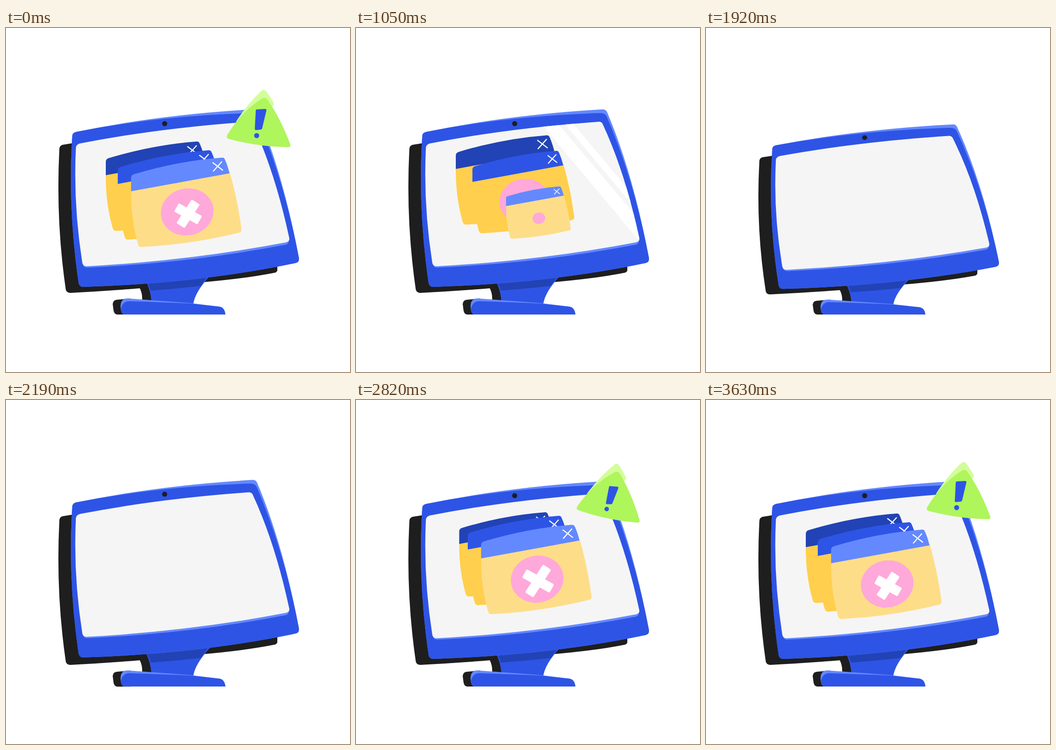
Animation, 748 px wide and 748 px high, one loop 3660 ms. Source, as an HTML page:

```html
<!DOCTYPE html>
<html lang="en">
<head>
<meta charset="utf-8">
<title>Monitor alert</title>
<style>
html, body { margin: 0; width: 100%; height: 100%; overflow: hidden; background: #fff; }
svg { display: block; width: 100vw; height: 100vh; }
.ink { fill: #1e1e1e; }
.blue { fill: #2e54e6; }
.navy { fill: #2143b5; }
.sky { fill: #6489ff; }
</style>
</head>
<body>
<svg viewBox="0 0 748 748" xmlns="http://www.w3.org/2000/svg">
  <defs>
    <path id="glass" d="M152 260Q153 253 161 251Q330 218 526 204Q533 203 536 208Q585 313 616 457Q617 464 609 466Q400 506 177 518Q168 519 166 511Q146 385 152 260Z"/>
    <clipPath id="pane"><use href="#glass"/></clipPath>
  </defs>
  <g id="monitor">
    <g id="shade" class="ink">
      <path d="M116 264Q116 256 123 254L160 248L540 480L590 500V526Q590 530 585 532Q520 545 425 553L330 562V592H296Q297 578 291 566Q215 572 140 576Q132 576 130 569Q108 418 116 264Z"/>
      <path d="M232 600Q233 592 240 591L270 588V623H242Q236 623 234 615Z"/>
    </g>
    <path class="blue" d="M302 540L450 532Q409 574 407 603H316Q317 574 302 546Z"/>
    <path class="navy" d="M302 540L446 532Q432 546 424 561Q370 567 315 571Q311 556 302 546Z"/>
    <path class="sky" d="M249 606Q249 588 264 588L400 598L465 606Q475 608 477 623H257Q250 622 249 606Z"/>
    <path class="blue" d="M250 610Q254 595 266 594Q330 596 400 599L465 606Q476 609 477 623H257Q251 622 250 610Z"/>
    <g id="head">
      <path class="sky" d="M144 236Q144 228 152 226Q330 189 535 177Q543 176 546 183Q602 315 637 500Q638 509 630 511Q420 555 168 563Q160 563 158 555Q134 392 144 236Z"/>
      <path class="blue" d="M144 236Q144 228 152 226Q330 191 530 185Q541 184 545 192Q605 332 637 500Q638 509 630 511Q420 555 168 563Q160 563 158 555Q134 392 144 236Z"/>
      <path class="sky" d="M166 508L168 516Q170 521 177 521Q400 511 609 471Q616 469 616 457Z"/>
      <use href="#glass" fill="#f5f5f5"/>
      <g clip-path="url(#pane)">
        <path id="glare" fill="#fff" d="M310 95L341 90L739 560L708 570ZM352 85L371 85L769 560L750 560Z"/>
      </g>
      <circle class="ink" cx="345" cy="208" r="5.5"/>
    </g>
  </g>
  <g id="windows"></g>
  <g id="alert">
    <path fill="#d3fd9b" d="M500 204Q524 166 555 137Q560 132 565 137Q574 148 583 165L560 200Z"/>
    <path fill="#aff55c" d="M481 233Q511 182 557 153Q562 150 567 154Q596 194 618 253Q620 260 612 259Q544 258 484 241Q478 239 481 233Z"/>
    <g id="mark" class="blue">
      <path d="M543 180Q543 177 546 177L563 176Q567 176 566 180L557 218Q556 221 553 221L544 222Q541 222 541 219Z"/>
      <circle cx="545" cy="234" r="5.5"/>
    </g>
  </g>
</svg>
<script>
const LOOP = 3660, BEAT = LOOP / 9;
const $ = id => document.getElementById(id);
const clamp = x => Math.min(1, Math.max(0, x));
const span = (t, from, length) => clamp((t - from) / length);
const wave = p => (1 - Math.cos(Math.PI * p)) / 2;
const hump = p => Math.sin(Math.PI * p);
const inOut = p => p < .5 ? 2 * p * p : 1 - 2 * (1 - p) ** 2;
const backIn = p => p * p * (3.5 * p - 2.5);
const pulse = t => wave(2 * (t + 20) / BEAT);

const about = (x, y, scale, turn = 0) =>
  `translate(${x} ${y}) rotate(${turn}) scale(${scale}) translate(${-x} ${-y})`;

function place(el, transform, shown = true) {
  el.setAttribute('transform', transform);
  el.setAttribute('visibility', shown ? 'visible' : 'hidden');
}

const windowArt = (bar, body) => `
  <path fill="${body}" d="M272 350L486 312Q503 370 512 437Q513 443 507 445Q400 471 296 476Q289 477 287 470Q271 414 272 350Z"/>
  <path fill="${bar}" d="M272 355V326Q272 320 278 318Q375 289 468 282Q474 281 476 286Q482 299 486 316Z"/>
  <path d="M450 293L471 309M469 291L451 311" fill="none" stroke="#fff" stroke-width="2.4" stroke-linecap="round"/>
  <ellipse class="dot" cx="394" cy="400" rx="57.5" ry="51" fill="#ffa8da"/>
  <g fill="#fff"><rect/><rect/></g>`;

// Back to front; "order" delays each window's entrance and exit.
const panes = [
  { dx: -55, dy: -35, order: 2, bar: '#2143b5', body: '#ffcf4d' },
  { dx: -29, dy: -16, order: 1, bar: '#2e54e6', body: '#ffcf4d' },
  { dx: 0, dy: 0, order: 0, bar: '#6489ff', body: '#fedd89' }
].map(p => {
  const g = document.createElementNS('http://www.w3.org/2000/svg', 'g');
  g.innerHTML = windowArt(p.bar, p.body);
  $('windows').append(g);
  return { ...p, g, dot: g.querySelector('.dot'), arms: g.querySelectorAll('rect') };
});

function leaving(t, order) {
  const start = 910 + 80 * order, gone = span(t, start, 310);
  const lift = wave(span(t, start - 180, 180));
  return { size: 1 - inOut(gone), lift, dot: 1 - inOut(span(gone, .15, .55)), cross: 1 - lift, hold: 0 };
}

function entering(t, order) {
  const start = 2410 + 60 * order;
  const lift = 1 - wave(span(t, start + 350, 180));
  return { size: inOut(span(t, start, 350)), lift, dot: 1, cross: wave(span(t, start + 180, 160)), hold: lift };
}

function drawPane({ dx, dy, order, g, dot, arms }, t) {
  const pose = (t < LOOP / 2 ? leaving : entering)(t, order);
  const rise = 14 * pose.lift * pose.size ** 3;
  place(g, `translate(${dx} ${dy - rise}) ${about(403, 440, pose.size)}`, pose.size > .002);
  dot.setAttribute('transform', about(394, 400, pose.dot * (1 + .04 * pulse(t)), -12));

  const reach = pose.cross * (.8 + .2 * Math.max(pulse(t), pose.hold));
  arms.forEach((arm, i) => {
    const len = (i ? 72 : 76) * reach, wide = 21 * Math.min(1, reach * 2);
    const attrs = { x: -len / 2, y: -wide / 2, width: len, height: wide, rx: 3 * reach,
      transform: `translate(396 404) rotate(${i ? 29 : -57})` };
    for (const name in attrs) arm.setAttribute(name, attrs[name]);
  });
}

function drawMonitor(t) {
  const hop = hump(span(t, 2140, 500));
  place($('monitor'), about(0, 622, `1 ${1 - .092 * hump(span(t, 1830, 310))}`));
  place($('head'), `translate(0 ${-10 * hop})`);
  place($('shade'), about(0, 576, `1 ${1 + .012 * hop}`));
  const sweep = t - (t < LOOP / 2 ? 990 : 2430);
  place($('glare'), `translate(${120 - 2 * sweep} 0)`, sweep > 0 && sweep < 360);
}

function drawAlert(t) {
  let size = 1 + .04 * pulse(t), turn = 0, settle = 0;
  if (t < LOOP / 2) {
    size *= 1 - backIn(span(t, 640, 350));
  } else {
    const swell = .04 + .16 * Math.exp(-Math.max(0, t - 3030) / 250);
    const pop = .44 * (1 - wave(span(t, 2460, 250)));
    size = wave(span(t, 2180, 265)) * (1 + swell * pulse(t) + pop);
    turn = 4 * hump(span(t, 2500, 640));
    settle = 1 - wave(span(t, 2460, 700));
  }
  place($('alert'), about(505, 234, size, turn), size > .002);
  place($('mark'), `translate(${6 * settle ** 2} ${8 * settle}) ` +
    about(550, 206, 1 - .24 * settle, 18 * settle ** 2));
}

const start = performance.now();
function frame() {
  const t = (performance.now() - start) % LOOP;
  drawMonitor(t);
  panes.forEach(p => drawPane(p, t));
  drawAlert(t);
  requestAnimationFrame(frame);
}
frame();
</script>
</body>
</html>
```
